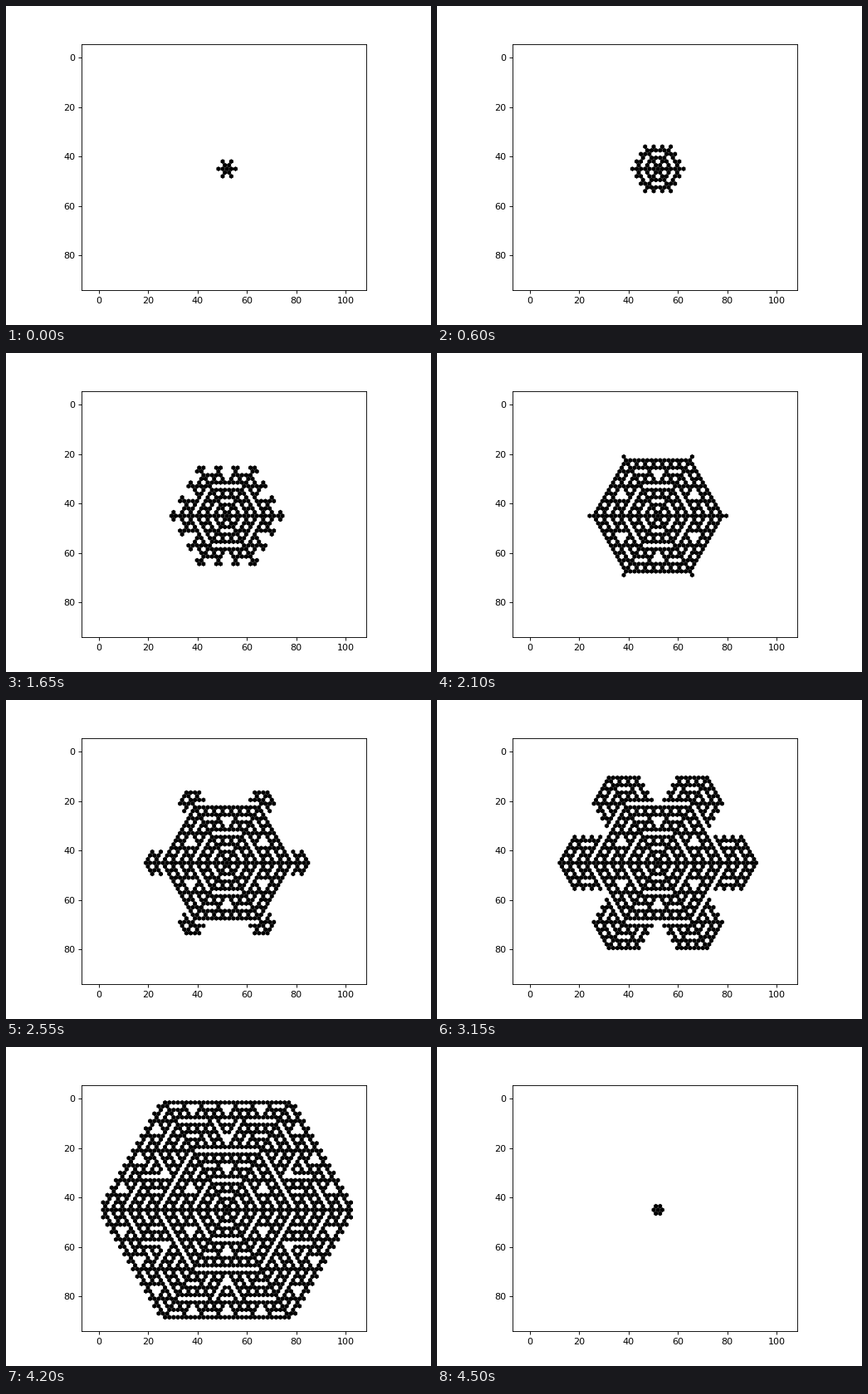
A matplotlib script that plays this animation: 512 px wide and 384 px high, repeating every 4.65 s.

```python
import numpy as np
import matplotlib.pyplot as plt
from matplotlib.animation import FuncAnimation
from matplotlib.collections import PolyCollection

SIZE = 60
STEPS = 31
INTERVAL = 150
START = 2

odd = (np.arange(SIZE) % 2 == 1)[:, None]


def grow(grid):
    """A cell freezes when exactly one of its six neighbours is frozen (wrapping edges)."""
    beside = np.roll(grid, 1, axis=1) + np.roll(grid, -1, axis=1)
    rows = np.roll(grid, 1, axis=0) + np.roll(grid, -1, axis=0)
    shifted = np.where(odd, np.roll(rows, 1, axis=1), np.roll(rows, -1, axis=1))
    count = beside + rows + shifted
    return np.where(count == 1, 1, grid)


def history():
    grid = np.zeros((SIZE, SIZE), dtype=int)
    grid[SIZE // 2, SIZE // 2] = 1
    grids = [grid]
    while len(grids) < STEPS:
        grids.append(grow(grids[-1]))
    return grids


def hexagons():
    angles = np.pi / 6 + np.arange(6) * np.pi / 3
    corners = np.column_stack([np.cos(angles), np.sin(angles)])
    row, col = np.mgrid[:SIZE, :SIZE]
    x = np.sqrt(3) * (col - 0.5 * (row % 2))
    y = 1.5 * row
    centers = np.column_stack([x.ravel(), y.ravel()])
    return centers[:, None, :] + corners


grids = history()

fig, ax = plt.subplots(figsize=(6.4, 4.8), dpi=80)
cells = PolyCollection(hexagons(), cmap="binary", edgecolors="none")
cells.set_clim(0, 1)
ax.add_collection(cells)
ax.set_aspect("equal")
ax.autoscale_view()
ax.invert_yaxis()


def update(i):
    cells.set_array(grids[(i + START) % STEPS].ravel())
    return [cells]


anim = FuncAnimation(fig, update, frames=STEPS, interval=INTERVAL,
                     repeat=True, repeat_delay=0)
plt.show()
```
